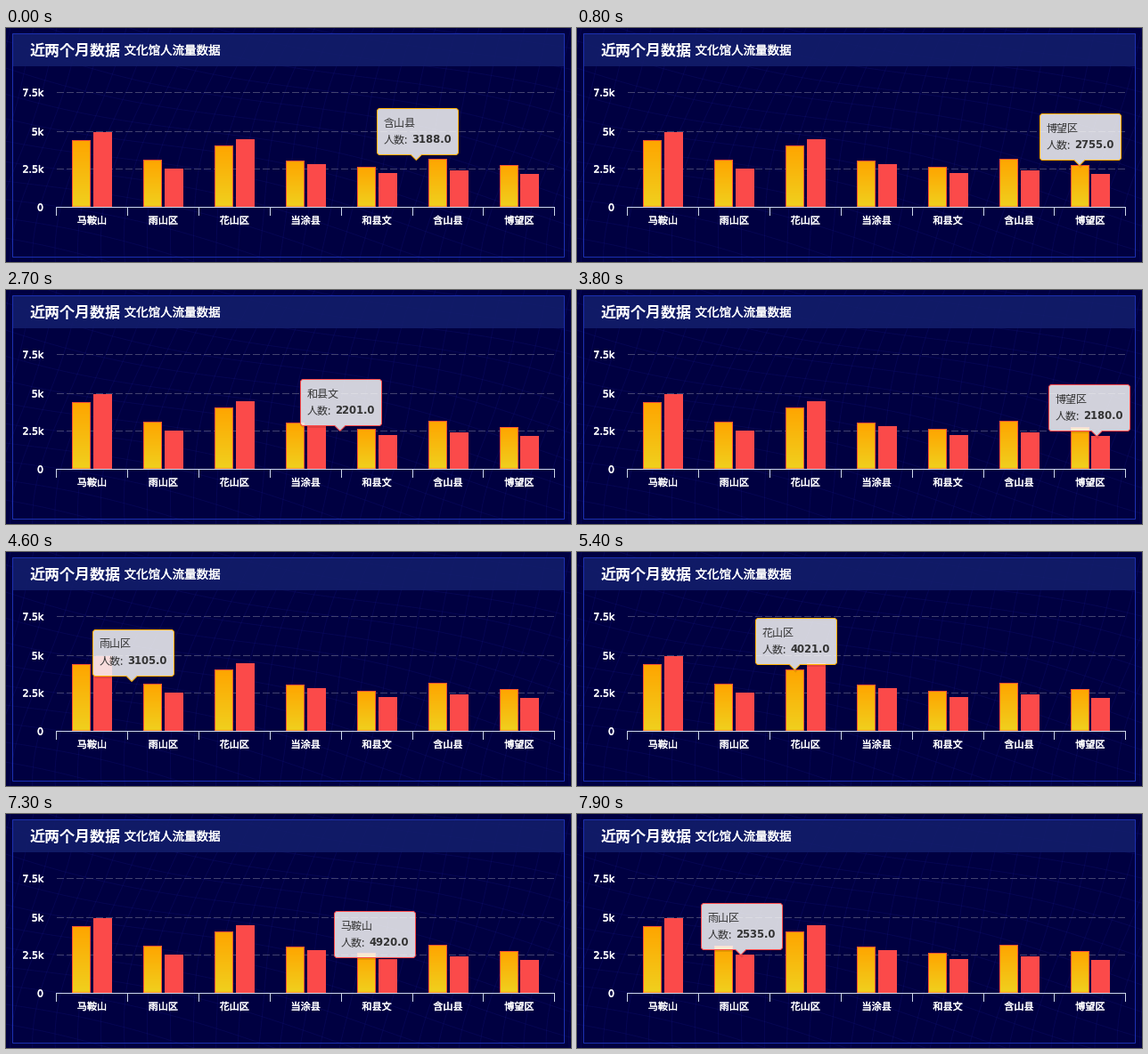
A matplotlib script that plays this animation: 634 px wide and 263 px high, repeating every 8 s.

```python
import numpy as np
import matplotlib.pyplot as plt
from matplotlib.animation import FuncAnimation
from matplotlib.colors import LinearSegmentedColormap
from matplotlib.patches import PathPatch, Rectangle
from matplotlib.path import Path
from matplotlib.patheffects import withStroke

W, H, DPI = 634, 263, 64
PX = 72 / DPI            # one pixel in points
STEP, FRAMES = 100, 80

NAMES = ["马鞍山", "雨山区", "花山区", "当涂县", "和县文", "含山县", "博望区"]
FIRST = [4390, 3105, 4021, 3020, 2640, 3188, 2755]
SECOND = [4920, 2535, 4450, 2815, 2201, 2405, 2180]
BASE, UNIT, SLOT = 201, 42.7 / 2500, 79.9
ORANGE, RED = "#ffb000", "#fb4a4a"
CJK, LATIN = "Noto Sans CJK JP", "DejaVu Sans"

plt.rcParams["path.snap"] = False
fig = plt.figure(figsize=(W / DPI, H / DPI), dpi=DPI, facecolor="#000041")
ax = fig.add_axes([0, 0, 1, 1])
ax.set_xlim(0, W)
ax.set_ylim(H, 0)
ax.axis("off")


def text(x, y, s, size, font=CJK, color="white", thicken=0, **kw):
    t = ax.text(x, y, s, fontsize=size * PX, family=font, color=color, **kw)
    if thicken:
        t.set_path_effects([withStroke(linewidth=thicken * PX, foreground=color)])
    return t


def line(xs, ys, color, width=1, **kw):
    ax.plot(xs, ys, color=color, lw=width * PX, solid_capstyle="butt", **kw)


def draw_mesh():
    u = np.linspace(0, 1, 40)
    for x0 in range(-60, 720, 24):
        line(x0 + 70 * (1 - u) ** 1.4 + 8 * np.sin(5 * u + x0 / 90), H * u,
             "#1c1c96", alpha=0.2, zorder=0)
    for y0 in range(-170, 270, 26):
        line(W * u, y0 + 150 * u + 12 * np.sin(6 * u + y0 / 60),
             "#1c1c96", alpha=0.2, zorder=0)


def draw_panel():
    ax.add_patch(Rectangle((8, 7), 619, 36, fc="#131e6c", alpha=0.87, lw=0, zorder=1))
    ax.add_patch(Rectangle((7.5, 6.5), 619, 251, fill=False, ec="#1c30b0",
                           lw=PX, zorder=1))
    text(27, 31.2, "近两个月数据", 17, weight="bold")
    text(132.6, 29.8, "文化馆人流量数据", 13.5, thicken=0.35)


def draw_axes():
    for y, label in ((72.5, "7.5k"), (116.5, "5k"), (158.5, "2.5k"), (201.5, "0")):
        text(42, y + 4, label, 11, LATIN, thicken=0.5, ha="right")
        if y < BASE:
            line([57, 616], [y, y], "#42426f", ls=(0, (8, 3)), zorder=2)
    line([56, 616], [201.5] * 2, "#ccd6eb", zorder=4)
    for i in range(8):
        x = round(56 + SLOT * i) + 0.5
        line([x, x], [201, 211], "#ccd6eb", zorder=4)
    for i, name in enumerate(NAMES):
        text(96.5 + SLOT * i, 220.2, name, 11.1, thicken=0.4, ha="center")


def draw_bars():
    fade = LinearSegmentedColormap.from_list("fade", ["#ffa500", "#f0d01e"])
    ramp = np.linspace(0, 1, 64)[:, None]
    for i in range(7):
        x, top = round(74.3 + SLOT * i), round(BASE - FIRST[i] * UNIT)
        ax.imshow(ramp, cmap=fade, extent=(x, x + 21, BASE, top),
                  aspect="auto", interpolation="bilinear", zorder=3)
        ax.add_patch(Rectangle((x + 0.5, top + 0.5), 20, BASE - top - 0.5,
                               fill=False, ec="#fb5230", lw=PX, zorder=3))
        x, top = round(98 + SLOT * i), round(BASE - SECOND[i] * UNIT)
        ax.add_patch(Rectangle((x, top), 21, BASE - top, fc=RED, lw=0, zorder=3))


draw_mesh()
draw_panel()
draw_axes()
draw_bars()

# Tooltip: visits the first series left to right, then the second.
BOX_W, BOX_H, TIP, TICK = 91, 52, 6, 32
START_BAR = 5
STARTS = [-80, 405, 855, 1305, 1760, 2215, 2690, 3150, 3605,
          4060, 4520, 4980, 5440, 5905, 6360, 6820, 7270, 7705]
RATE = np.array([2 / 3, 1 / 2, 2 / 3, 1 / 2])


def bar(k):
    series, i = divmod(k % 14, 7)
    return series, i, (FIRST, SECOND)[series][i]


def rest(k):
    """Box left, box top, anchor x and anchor y for bar k."""
    series, i, value = bar(k)
    tip_x, tip_y = 84.5 + 24 * series + SLOT * i, BASE - value * UNIT
    top = tip_y - BOX_H - TIP
    if top < 62:
        top = tip_y + TIP
    return np.array([min(tip_x - 44.5, 533), top, tip_x, tip_y])


def pose(t):
    p = rest(START_BAR - 1)
    ends = STARTS[1:] + [10 ** 6]
    for j, (start, end) in enumerate(zip(STARTS, ends)):
        if t < start:
            break
        goal, k = rest(START_BAR + j), START_BAR + j
        ticks = (min(t, end) - start) // TICK + 1
        p = goal + (p - goal) * RATE ** ticks
        if np.all(abs(p - goal)[:2] <= 1):
            p = goal
    return k, p


def bubble(x, y, tip_x, tip_y, r=3):
    x1, y1 = x + BOX_W, y + BOX_H
    pts, codes = [(x + r, y)], [Path.MOVETO]

    def to(*points):
        pts.extend(points)
        codes.extend([Path.LINETO if len(points) == 1 else Path.CURVE3] * len(points))

    def arrow(edge, dx, dy):
        for point in ((tip_x - dx, edge), (tip_x, edge + dy), (tip_x + dx, edge)):
            to(point)

    if tip_y < y:
        arrow(y, TIP, -TIP)
    to((x1 - r, y))
    to((x1, y), (x1, y + r))
    to((x1, y1 - r))
    to((x1, y1), (x1 - r, y1))
    if tip_y > y1:
        arrow(y1, -TIP, TIP)
    to((x + r, y1))
    to((x, y1), (x, y1 - r))
    to((x, y + r))
    to((x, y), (x + r, y))
    pts.append((x + r, y))
    codes.append(Path.CLOSEPOLY)
    return Path(pts, codes)


def outline(z, **kw):
    return ax.add_patch(PathPatch(bubble(0, 0, 40, 99), zorder=z, **kw))


shadow = outline(6, fill=False, ec="black", alpha=0.1, lw=3 * PX)
body = outline(7, fc=(0.969, 0.969, 0.969, 0.85), lw=PX)
head = text(0, 0, "", 12, color="#333333", zorder=8)
label = text(0, 0, "人数:", 12, color="#333333", zorder=8)
number = text(0, 0, "", 11.6, LATIN, color="#333333", weight="bold", zorder=8)


def update(n):
    k, (x, y, tip_x, tip_y) = pose(n * STEP)
    series, i, value = bar(k)
    x, y = round(x), round(y)
    body.set_path(bubble(x + 0.5, y + 0.5, tip_x, tip_y))
    body.set_edgecolor(RED if series else ORANGE)
    shadow.set_path(bubble(x + 1.5, y + 1.5, tip_x + 1, tip_y + 1))
    head.set_text(NAMES[i])
    number.set_text(f"{value:.1f}")
    head.set_position((x + 7.7, y + 20.5))
    label.set_position((x + 7.7, y + 39.3))
    number.set_position((x + 39, y + 39.3))
    return [shadow, body, head, label, number]


anim = FuncAnimation(fig, update, frames=FRAMES, interval=STEP,
                     repeat=True, repeat_delay=0, blit=False)
plt.show()
```
